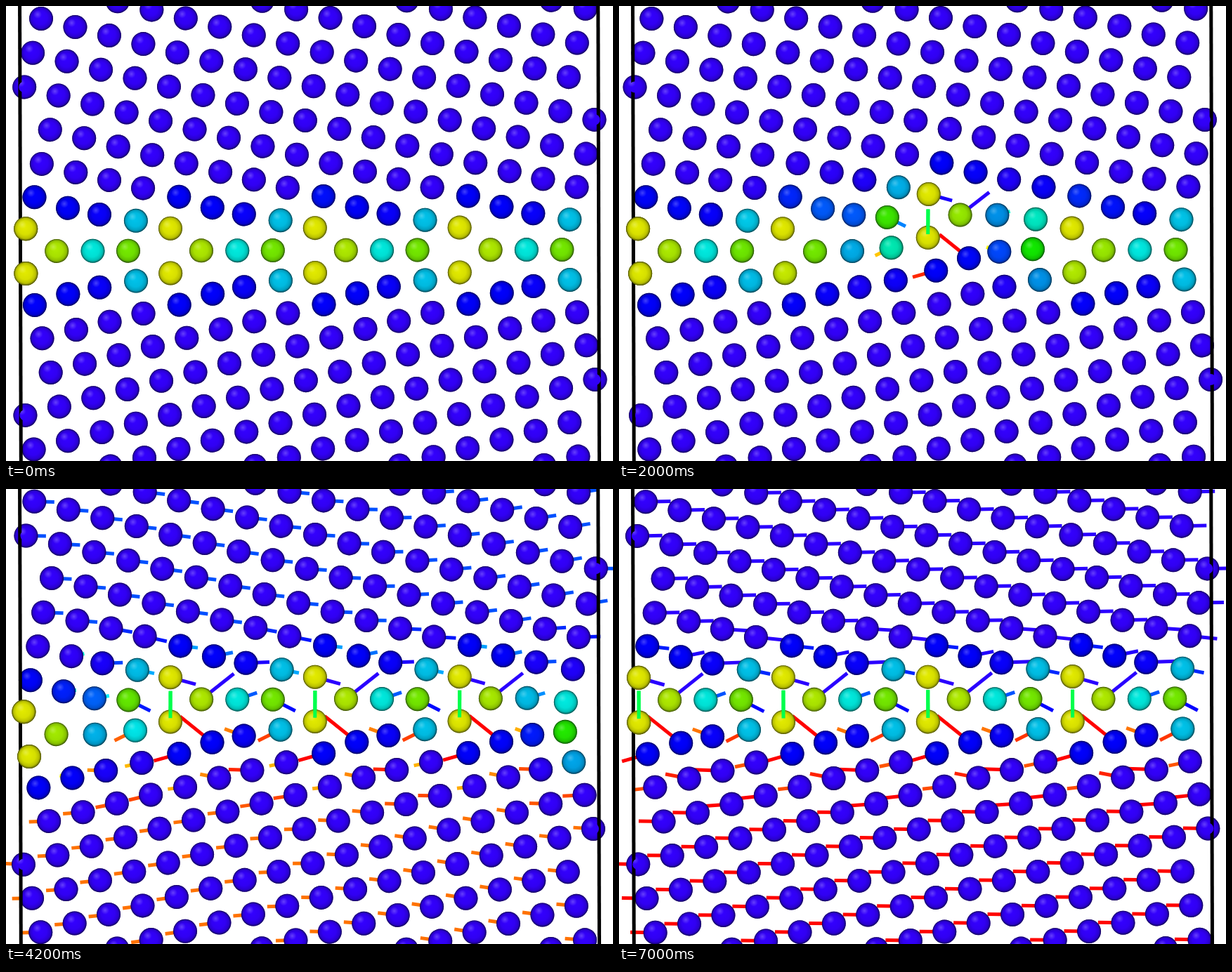
Write an HTML page with a canvas that moves like this. It is 864 px wide and 648 px high and loops after 8 s.

```html
<!DOCTYPE html>
<html lang="en">
<head>
<meta charset="utf-8">
<title>Grain boundary migration</title>
<style>
html, body { margin: 0; width: 100%; height: 100%; overflow: hidden; background: #fff; }
canvas { display: block; }
</style>
</head>
<body>
<canvas id="stage" width="864" height="648"></canvas>
<script>
const ctx = document.getElementById('stage').getContext('2d');
const PERIOD = 205.8, CELLS = 4, LEFT = 20.5, WIDTH = CELLS * PERIOD;
const TILT = 0.0027, MIRROR = 697.8, CLIMB = 48.5, RADIUS = 17, ARROW = 2.95;
const LOOP = 8000;

// slip: sliding of the grains; reach and edge: width and sharpness of the region
// that has switched; back: its reach in the rear layer; bend: vertical strain
const POSES = [
  { start: 0, slip: 0, reach: 1, edge: 4, bend: 0 },
  { start: 1000, slip: .15, reach: 1, edge: 4, bend: 0 },
  { start: 2000, slip: .3, reach: 100, edge: 4, bend: 0 },
  { start: 3000, slip: .8, reach: 315, edge: 20, bend: 1.4 },
  { start: 5000, slip: .85, reach: 335, edge: 12, back: 390, bend: .9 },
  { start: 6000, slip: .92, reach: 900, edge: 12, bend: .2 },
  { start: 7000, slip: 1, reach: 900, edge: 12, bend: 0 }
];

// Relaxed sites of one boundary cell down to the mirror line: x, y, hue
const CORE_START = 19;
const CORE = [
  [147.3, 248, 252], [195.3, 259.6, 252], [40.7, 272, 240], [88.2, 287.6, 240], [133.1, 297, 242],
  [185, 306, 190], [28.3, 317, 62], [72.2, 348.8, 75], [123.5, 348.8, 177], [174, 348.8, 90]
];

const mod = (a, n) => ((a % n) + n) % n;
const mix = (a, b, t) => a + (b - a) * t;
const clamp = (v, lo, hi) => Math.max(lo, Math.min(hi, v));

const upper = n => CORE[n - CORE_START] || [50.9 + 48.44 * n, 17.8 + 12.17 * n, n < 20 ? 252 : 240];

// Sites are numbered downwards; the lower grain mirrors the upper one
function site(i) {
  if (i < 29) return upper(i);
  const group = Math.floor((i - 33) / 4), j = mod(i - 33, 4);
  const [x, y, hue] = upper(21 - 4 * group - (j && 4 - j));
  return [x, MIRROR - y, hue];
}

// When the boundary climbs, each site takes the place of the one four further on
function atomAt(i, cell, pose, reach) {
  const [sx, y0, h0] = site(i), [ex, ey, h1] = site(i + 4);
  const x0 = LEFT + mod(sx - LEFT, PERIOD) + cell * PERIOD;
  const dx = mod(ex - sx + PERIOD / 2, PERIOD) - PERIOD / 2, dy = ey - CLIMB - y0;
  const switched = 1 / (1 + Math.abs((x0 - 455) / reach) ** pose.edge);
  let mx, my;
  if (i > 20 && i < 30) {
    const drift = 7 * pose.slip * clamp((i - 26.5) / 3, -1, 1);
    const t = switched * mix(.85, 1, pose.slip);
    mx = mix(drift, dx, t);
    my = dy * t;
  } else {
    const near = i > 16 && i < 34;
    const t = pose.slip * (near ? mix(.65, 1, switched) : 1);
    mx = dx * t;
    my = dy * t;
    if (!near) my -= pose.bend * Math.sin(x0 / (i < 21 ? 175 : 140));
  }
  return { i, mx, my, x: LEFT + mod(x0 + mx - LEFT, WIDTH), y: y0 + my, hue: mix(h0, h1, switched) };
}

function layer(from, to, pose, reach) {
  const atoms = [];
  for (let i = from; i <= to; i++)
    for (let cell = 0; cell < CELLS; cell++) atoms.push(atomAt(i, cell, pose, reach));
  return atoms;
}

function line(x1, y1, x2, y2, color) {
  ctx.strokeStyle = color;
  ctx.lineWidth = 5;
  ctx.beginPath();
  ctx.moveTo(x1, y1);
  ctx.lineTo(x2, y2);
  ctx.stroke();
}

// Arrows point back along the enlarged displacement, coloured by its x part
function arrow({ x, y, mx, my }, from = 0) {
  const vx = -mx * ARROW, vy = -my * ARROW;
  let hue = 138;
  if (vx > 8) hue = Math.min(250, 214 + 5 * (vx - 27));
  if (vx < -8) hue = clamp(32 + 3.6 * (vx + 27), 0, 60);
  line(x + vx * from, y + vy * from, x + vx, y + vy, `hsl(${hue},100%,50%)`);
}

function radial(x, y, r0, cx, cy, r, stops, tone) {
  const g = ctx.createRadialGradient(x, y, r0, cx, cy, r);
  for (const [at, alpha] of stops) g.addColorStop(at, `rgba(${tone},${tone},${tone},${alpha})`);
  return g;
}
const shade = radial(-2, -3, 1, 0, 0, RADIUS, [[0, 0], [.55, .05], [.82, .18], [.93, .42], [1, .78]], 0);
const shine = radial(-5, -6, 0, -5, -6, 6, [[0, .25], [1, 0]], 255);

function ball({ x, y, hue }, r = RADIUS) {
  ctx.save();
  ctx.translate(x, y);
  ctx.beginPath();
  ctx.arc(0, 0, r, 0, 7);
  for (const fill of [`hsl(${hue},100%,${hue > 205 ? 50 : 46}%)`, shade, shine]) {
    ctx.fillStyle = fill;
    ctx.fill();
  }
  ctx.restore();
}

function draw(pose) {
  ctx.setTransform(1, 0, 0, 1, 0, 0);
  ctx.fillStyle = '#fff';
  ctx.fillRect(0, 0, 864, 648);
  ctx.setTransform(1, -TILT, TILT, 1, -TILT * 349, TILT * 120);

  const front = layer(-3, 53, pose, pose.reach);
  const rear = pose.back ? layer(21, 29, pose, pose.back) : [];
  const atoms = [...rear, ...front];
  atoms.forEach(a => arrow(a));
  atoms.forEach(a => ball(a));

  const walls = [LEFT, LEFT + WIDTH];
  for (const x of walls) line(x, -9, x, 660, '#000');
  // Atoms on a wall bulge through its line
  for (const a of atoms)
    if (walls.some(x => Math.abs(a.x - x) < RADIUS)) ball(a, a.hue > 200 ? 8 : RADIUS);
  // The steep arrows lie in front
  for (const a of front) if (a.my > 10 && Math.abs(a.mx) < 2) arrow(a, .12);
}

let shown;
function tick(now) {
  const t = now % LOOP, pose = POSES.filter(p => p.start <= t).pop();
  if (pose !== shown) draw(shown = pose);
  requestAnimationFrame(tick);
}
tick(performance.now());
</script>
</body>
</html>
```
